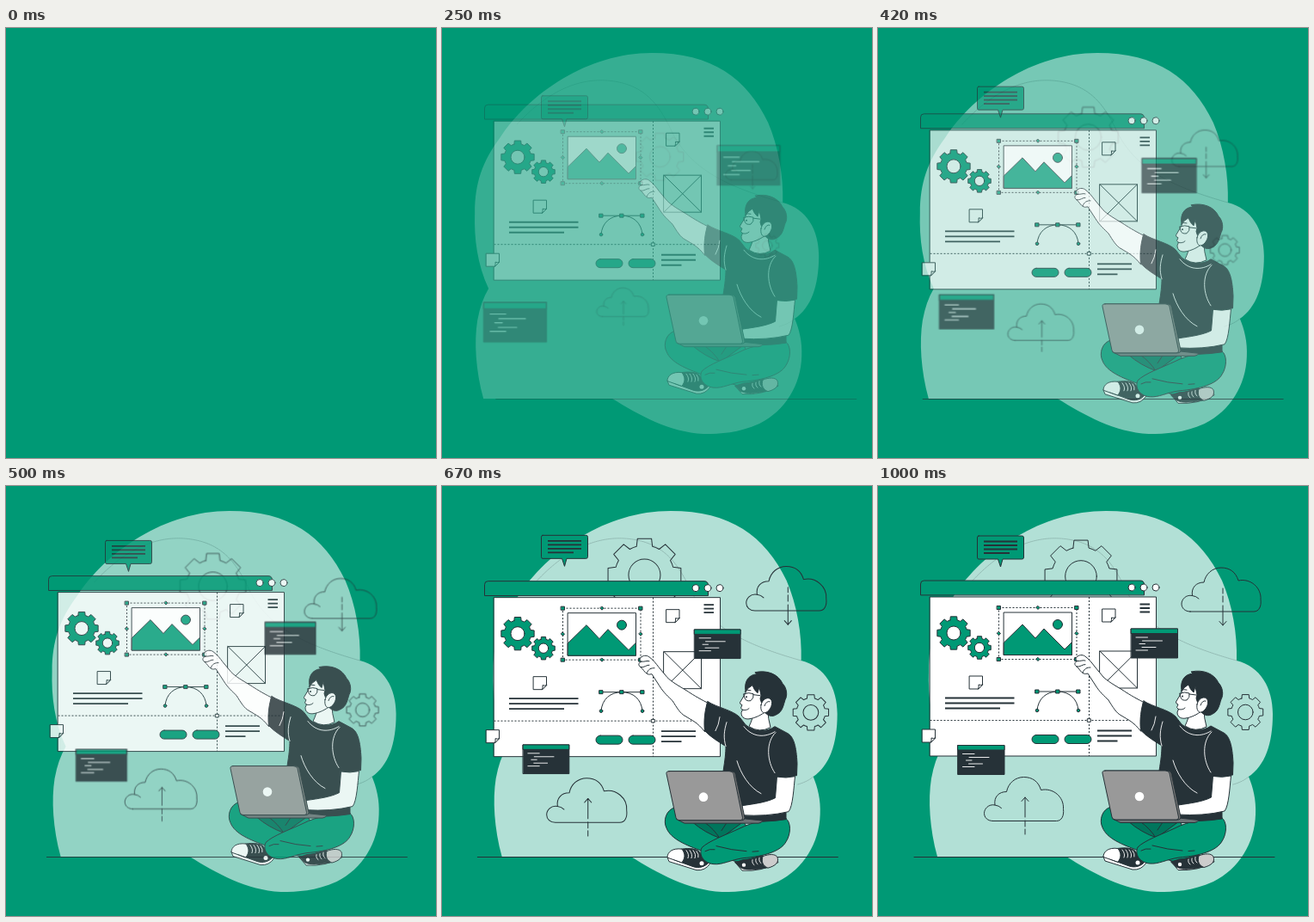
Write an HTML page that moves like this. It is 500 px wide and 500 px high and loops after 1040 ms.

```html
<!DOCTYPE html>
<html lang="en">
<head>
<meta charset="utf-8">
<title>Web designer at work</title>
<style>
  html, body { margin: 0; width: 100%; height: 100%; overflow: hidden; background: #009975; }
  svg { display: block; width: 500px; height: 500px; fill: none; }
  [data-move] { opacity: 0; }

  .ink { stroke: #263238; stroke-width: 1; stroke-linejoin: round; stroke-linecap: round; }
  .white { fill: #fff; }
  .green { fill: #009975; }
  .dark { fill: #263238; }
  .bold { stroke-width: 1.9; stroke-linecap: butt; }
  .light { stroke: #fff; stroke-width: .9; stroke-linecap: round; }
  .dots { stroke-dasharray: 2 2; stroke-linecap: butt; }
</style>
</head>
<body>
<svg id="scene" viewBox="0 0 500 500">
  <defs>
    <g id="cloud">
      <path d="M10 51H84C90 51 93 45 92 37C93 23 80 12 66 15C63 5 56 0 46 0C36 0 28 7 26 17C17 17 11 23 12.500 32.500C5 31 0 37 0 42C0 47 4 51 10 51Z"/>
      <path d="M12.500 32.500Q17 33 20 36"/>
    </g>
    <g id="arrow">
      <path d="M0 0V43" stroke-dasharray="23 4 7 3 6"/>
      <path d="M-4 4.500L0 0L4 4.500"/>
    </g>
    <g id="panel">
      <path class="ink dark" d="M0 0H54V34H0Z"/>
      <path class="ink green" d="M0 0H54V5.500H0Z"/>
      <path class="light" d="M5.500 10H19M13 14H36M9.500 17.500H16M12.500 21.500H28.500M5.500 25H19"/>
    </g>
    <g id="note">
      <path class="ink white" d="M0 0H15V10L10 15H0Z"/>
      <path class="ink white" d="M10 15Q11 12 10.500 10Q13 11 15 10Z"/>
    </g>
    <rect id="knob" class="ink green" x="-2" y="-2" width="4" height="4"/>
    <path id="button" class="ink green" d="M5 0H26A5 5 0 0 1 26 10H5A5 5 0 0 1 5 0Z"/>
  </defs>

  <g data-move="fromLeft">
    <path fill="#b2e0d6" d="M69 431C60 398 58 365 62 340Q66 318 75 303C62 275 58 245 59 215C59 180 68 155 88 128C122 76 190 29 265 29C335 29 375 58 400 110C412 138 418 172 417 203C445 210 459 235 459 265C459 300 450 325 431 338C436 350 440 365 439 382C438 415 420 445 390 460C365 471 345 472 325 472C285 470 250 450 219 431Z"/>
    <path class="ink" stroke-dasharray="1 1" stroke-opacity=".45" style="stroke-width:.5" d="M108 112C145 72 180 59 212 61C255 64 272 88 286 116C307 163 350 184 417 203M413 347Q424 344 431 338"/>
  </g>

  <path data-move="fromRight" class="ink" d="M42 431.500H461"/>

  <g data-move="grow" class="ink">
    <path data-gear="236 105 42.700"/>
    <circle cx="236" cy="105" r="18.300"/>
    <path data-gear="427.300 263 20.800"/>
    <circle cx="427.300" cy="263" r="8.800"/>
    <use href="#cloud" x="353" y="95"/>
    <use href="#arrow" transform="translate(401 162) scale(1 -1)"/>
    <use href="#cloud" x="123.500" y="338.500"/>
    <use href="#arrow" x="171" y="362"/>
  </g>

  <!-- browser window -->
  <g data-move="fromTop">
    <path class="ink green" d="M49.500 126.500V114Q49.500 110 53.500 110H305Q309.500 110 309.500 115V126.500Z"/>
    <path class="ink white" d="M60.500 129H323.500V314H60.500Z"/>
    <g class="ink white">
      <circle cx="295" cy="118" r="4"/>
      <circle cx="309" cy="118" r="4"/>
      <circle cx="323" cy="118" r="4"/>
    </g>
    <path class="ink dots" d="M245.500 129V314M60.500 272.500H323.500"/>
    <rect class="ink white" x="243.700" y="270.700" width="3.600" height="3.600"/>

    <path class="ink green" data-gear="88 171 19.500"/>
    <circle class="ink white" cx="88" cy="171" r="8"/>
    <path class="ink green" data-gear="118 188 13.500"/>
    <circle class="ink white" cx="118" cy="188" r="5.700"/>

    <path class="ink bold" d="M304.500 137.500H316M304.500 142H316M304.500 146.500H316"/>
    <use href="#note" x="261" y="143"/>
    <use href="#note" x="106.500" y="221"/>
    <use href="#note" x="51.500" y="283"/>
    <path class="ink" d="M258 192H301.500V235H258ZM258 192L301.500 235M301.500 192L258 235"/>
    <path class="ink bold" d="M78 246.500H158.500M78 252.500H158.500M78 258.500H142"/>
    <path class="ink" d="M185 239H233M185 261C186 247 196 239 209 239C222 239 232 247 233 261"/>
    <use href="#knob" x="185" y="239"/>
    <use href="#knob" x="209" y="239"/>
    <use href="#knob" x="233" y="239"/>
    <g class="ink green">
      <circle cx="185" cy="261" r="1.800"/>
      <circle cx="233" cy="261" r="1.800"/>
    </g>
    <use href="#button" x="179" y="289.500"/>
    <use href="#button" x="217" y="289.500"/>
    <path class="ink bold" d="M255 284.500H295M255 290.500H295M255 296.500H278.500"/>
  </g>

  <!-- selected picture -->
  <g data-move="fromTop">
    <path class="ink white" d="M146.500 147H225.500V196.500H146.500Z"/>
    <path class="ink green" d="M146.500 182L168 161L183 177L193 166L217 190L225.500 181.500V196.500H146.500Z"/>
    <circle class="ink green" cx="209" cy="161" r="5.500"/>
    <path class="ink dots" d="M140.500 141.500H231V201.500H140.500Z"/>
    <use href="#knob" x="140.500" y="141.500"/>
    <use href="#knob" x="231" y="141.500"/>
    <use href="#knob" x="140.500" y="201.500"/>
    <use href="#knob" x="231" y="201.500"/>
    <path class="ink green" d="M186 139.500l2 2l-2 2l-2 -2ZM186 199.500l2 2l-2 2l-2 -2ZM140.500 169.500l2 2l-2 2l-2 -2ZM231 169.500l2 2l-2 2l-2 -2Z"/>
  </g>

  <g data-move="fromBottom">
    <path class="ink green" d="M117 58H167.500Q169.500 58 169.500 60V83Q169.500 85 167.500 85H145L142.500 94L139.500 85H117Q115.500 85 115.500 83V60Q115.500 58 117 58Z"/>
    <path class="ink bold" d="M123 64.500H162M123 69H162M123 73.500H162M123 78H153"/>
  </g>

  <g data-move="shrink">
    <use href="#panel" x="294.500" y="166"/>
    <use href="#panel" x="93" y="301.500"/>
  </g>

  <g data-move="fromTop">
    <!-- raised arm -->
    <path class="ink white" d="M308 251C298 246 290 241 284 237C274 231 267 227 262 222L252 210C249 206 246 202 242 199C239 196 235 196 232 198C229 200 230 203 232 203.500C228 205 228 208 231 210C234 212 235 216 239 218C241 219 243 218 244 218L253 232C258 240 263 244 268 249C273 257 277 264 283 267C291 272 297 274 305.500 285Z"/>
    <path class="ink" d="M232 203.500C236 204 238 202 241 203M231 210C235 211 238 207 241 207.500M238 217C240 212 243 211 247 211"/>

    <!-- legs and shoes -->
    <path class="ink green" d="M271 373C260 376 257 389 261 397C266 410 284 417 303 424L345 437L372 429L350 388H276Z"/>
    <path class="ink" fill="#00755c" d="M291 390H350L324 409Q306 403 291 390Z"/>
    <path class="ink" d="M306 391Q316 398 323 409M331 391L325 400"/>
    <path class="ink white" d="M262 431L264 436L296 446Q306 447 312 438L308 433Z"/>
    <path class="ink dark" d="M278 421.500C288 420 298 421 300 426L311 436C306 443 298 444 292 442L270 434Z"/>
    <path class="ink white" d="M262 431C262 425 268 420 279 421.500C283 427 283 432 279 437Z"/>
    <path class="light" d="M284 423Q288 428 286 432M288 423Q292 428 290 432M292 423Q296 428 294 432M296 424Q299 428 298 431"/>
    <circle class="white" cx="302" cy="438" r="2.500"/>
    <path class="ink white" d="M341 437L349 446.500Q372 448 391 437L388 430Z"/>
    <path class="ink dark" d="M341 437L350 434Q364 433 373 429L379 443C367 445 353 447 347 443Z"/>
    <path class="ink" fill="#ccc" d="M373 430C380 427 388 427 390 431C392 437 388 441 379 443.500C373 441 371 436 373 430Z"/>
    <path class="light" d="M361 434Q360 438 363 440M365 433Q364 437 367 439M369 431.500Q368 436 371 438"/>
    <circle class="white" cx="351" cy="440" r="2.200"/>
    <path class="ink green" d="M400 386C406 390 406 404 400 413C394 424 375 430 350 432C336 434 326 440 316 439C305 438 298 429 302 420C310 412 330 405 345 398C362 389 385 386 400 386Z"/>
    <path class="ink" d="M319 418Q337 423 354 424M361 424.500L368 424M306 424Q311 421 317 422"/>

    <!-- shirt -->
    <path class="ink dark" d="M309 250C320 257 338 260 346 268L353 277C362 285 378 286 387 279L402 287C409 291 412 302 413 322L412.500 336Q401 339 388.500 337C389 350 391 364 400 372V387Q375 391 340 389L327 331C329 318 330 310 330 302C322 297 312 291 305.500 284C304 272 306 258 309 250Z"/>
    <path class="light" d="M343 319C347 333 357 350 371 357M388 286C376 297 378 320 387 333M331 274C328 284 327 292 330 302M318 284Q322 277 323 268M351 279C361 292 376 292 387 285"/>

    <!-- neck and head -->
    <path class="ink white" d="M362 262L361 269Q359 275 357 279Q369 287 382 280Q379 270 379 260Z"/>
    <path class="ink white" d="M356 227L353 240L346.500 251Q346 253 349 254L347.500 257.500L349.500 259.500L348 263C348 269 353 271 358 270C364 269 371 266 377 261L375 238L364 226Z"/>
    <path class="ink dark" d="M353 238C351 227 356 219 366 218L364 216C378 213 391 218 396 229C401 234 402 243 399 248C397 254 396 262 389 265C385 268 379 267 376 263L371 250Q369 247 371 243L369 233L367 240Q363 237 361 231Q357 233 353 238Z"/>
    <path class="ink white" d="M371 254C372 248 378 244 382 247C386 251 382 261 376 263C372 264 370 259 371 254Z"/>
    <path class="ink" d="M375 255Q377 249 381 250M351 241Q357 239 362 241Q363 246 359 249Q353 250 352 246ZM362 242L370 243M349 259.500Q354 261 357 258M352 238.500Q355 235.500 359 237"/>
    <circle class="dark" cx="354" cy="244.500" r="1"/>

    <!-- lower arm and laptop -->
    <path class="ink white" d="M389.500 337.500L387.500 362C378 367 363 369 349 371L348 382Q378 384 403 378C408 372 409 350 410.500 337Q400 339.500 389.500 337.500Z"/>
    <path class="ink" fill="#6d7376" d="M273 387L282 391.500H368Q372 391 373 388.500L350 386Z"/>
    <path class="ink" fill="#777" d="M265 331H336Q340 331 341 334L352 385Q352 388 349 388H275Z"/>
    <path class="ink" fill="#999" d="M264 331H334Q338 331 339 334L349.500 385Q350 388 347 388H276Q273 388 272 385L261 334Q260.500 331 264 331Z"/>
    <circle class="white" cx="304" cy="361" r="5.300"/>
  </g>
</svg>
<script>
  const LOOP = 1040, FPS = 24;
  const scene = document.getElementById('scene');
  const parts = scene.querySelectorAll('[data-move]');

  const scaleAt = (x, y, k) => `translate(${x} ${y}) scale(${k}) translate(${-x} ${-y})`;

  // Each move gets the share of the way still to go.
  const moves = {
    fromLeft: rest => `translate(${-30 * rest} 0)`,
    fromRight: rest => `translate(${30 * rest} 0)`,
    fromTop: rest => `translate(0 ${-30 * rest})`,
    fromBottom: rest => `translate(0 ${30 * rest})`,
    grow: rest => scaleAt(286, 234, 1 - rest / 2),
    shrink: rest => scaleAt(221, 250.5, 1 + rest / 2)
  };

  // Eight-toothed wheel with one tooth pointing straight up.
  function gearPath(cx, cy, radius) {
    const root = radius * .8;
    const at = (r, a) => `${(cx + r * Math.sin(a)).toFixed(2)} ${(cy - r * Math.cos(a)).toFixed(2)}`;
    let d = '';
    for (let i = 0; i < 8; i++) {
      const a = i * Math.PI / 4;
      d += i ? `A${root} ${root} 0 0 1 ` : 'M';
      d += `${at(root, a - .27)}L${at(radius, a - .19)}L${at(radius, a + .19)}L${at(root, a + .27)}`;
    }
    return d + `A${root} ${root} 0 0 1 ${at(root, -.27)}Z`;
  }

  for (const el of scene.querySelectorAll('[data-gear]')) {
    el.setAttribute('d', gearPath(...el.dataset.gear.split(' ').map(Number)));
  }

  const bezier = (a, b, s) => 3 * a * s * (1 - s) ** 2 + 3 * b * s * s * (1 - s) + s ** 3;

  // cubic-bezier(.36, -.01, .5, 1.38): overshoots, then settles.
  function ease(t) {
    if (t >= 1) return 1;
    let lo = 0, hi = 1;
    for (let i = 0; i < 30; i++) {
      const mid = (lo + hi) / 2;
      if (bezier(.36, .5, mid) < t) lo = mid; else hi = mid;
    }
    return bezier(-.01, 1.38, lo);
  }

  // Motion runs in steps of 24 per second; the first two stay empty.
  function draw(now) {
    const step = Math.floor((now % LOOP + 4) * FPS / 1000);
    const p = step < 2 ? 0 : ease((step + 1) / FPS);
    for (const el of parts) {
      el.style.opacity = Math.min(p, 1);
      el.setAttribute('transform', moves[el.dataset.move](1 - p));
    }
    requestAnimationFrame(draw);
  }
  requestAnimationFrame(draw);
</script>
</body>
</html>
```
